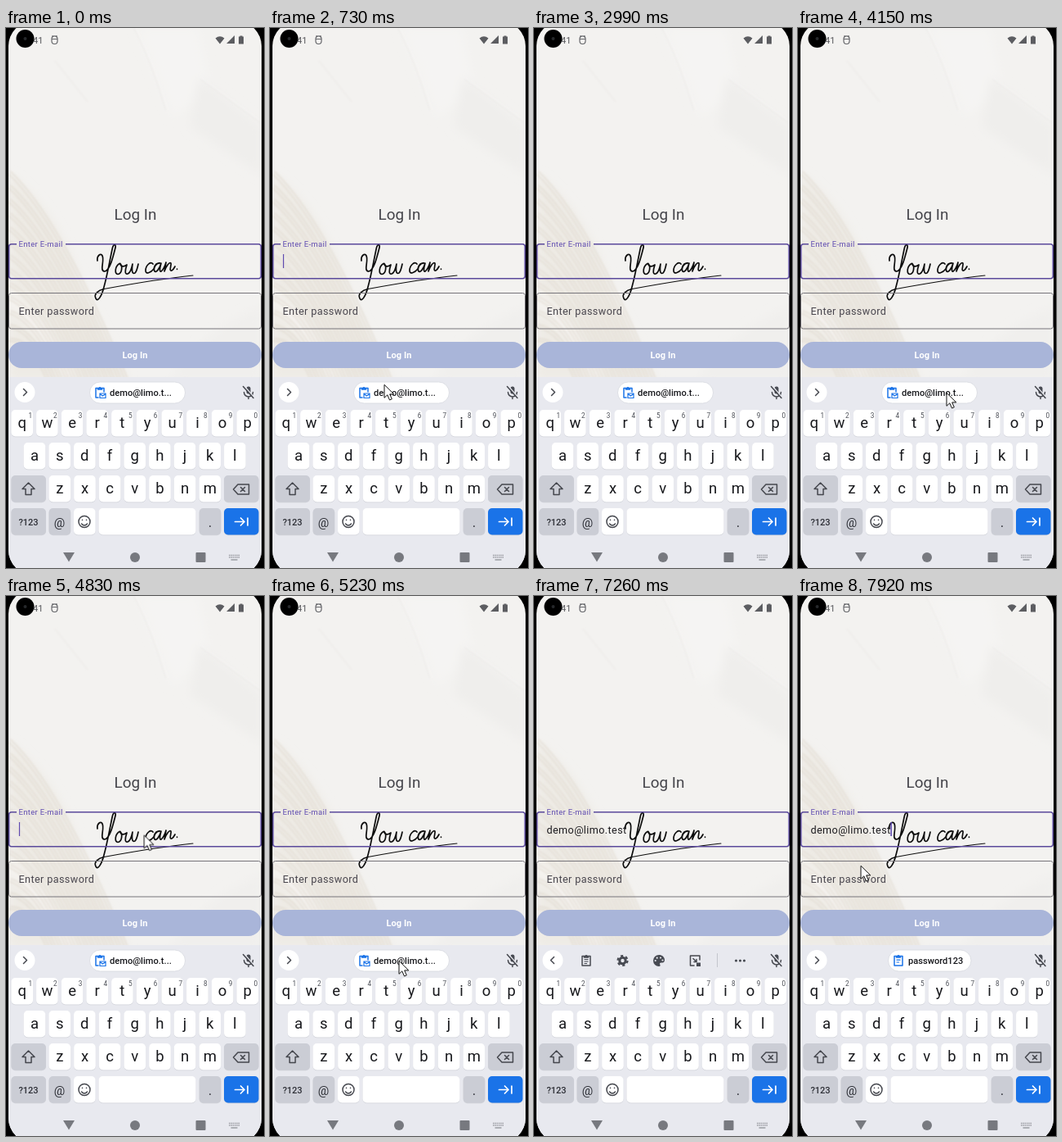
An HTML page for the animation above (7.99 s loop, 316 px wide and 659 px high).

```html
<!DOCTYPE html>
<html lang="en">
<head>
<meta charset="utf-8">
<title>Log In</title>
<style>
html, body { margin: 0; width: 100%; height: 100%; overflow: hidden; background: #000; }
svg { display: block; width: 100%; height: 100%; font-family: Roboto, "Noto Sans", sans-serif; }
.mid { text-anchor: middle; }
.field { font-size: 12.63px; letter-spacing: .39px; }
.key { font-size: 18.5px; text-anchor: middle; fill: #17181c; }
.hint { font-size: 8.2px; text-anchor: middle; fill: #4b4e56; }
.chip text { font-size: 11.1px; font-weight: 500; fill: #17181c; }
.line { fill: none; stroke: #45474e; stroke-width: 1.5; stroke-linecap: round; stroke-linejoin: round; }
.ink { fill: none; stroke: #0c0c0c; stroke-width: 1.7; stroke-linecap: round; stroke-linejoin: round; }

.anim { animation: 7990ms step-end infinite; }
#caret { animation-name: blink; }
#typed { animation-name: typed; }
#caretEnd { animation-name: blinkEnd; }
#mail { animation-name: mail; }
#tools { animation-name: tools; }
#pass { animation-name: pass; }
#mouse { animation-name: move, show; animation-duration: 7990ms, 7990ms; }

@keyframes blink {
  0%, 13.34%, 24.98%, 37.37%, 49.26%, 62.9%, 70.54%, 100% { opacity: 0; }
  6.71%, 19.22%, 31.61%, 43.38%, 57.02%, 68.79% { opacity: 1; }
}
@keyframes typed { 0% { opacity: 0; } 70.54%, 100% { opacity: 1; } }
@keyframes blinkEnd {
  0%, 77.3%, 90.81% { opacity: 0; }
  70.54%, 84.18%, 97.45%, 100% { opacity: 1; }
}
@keyframes mail {
  0% { opacity: 1; }
  69.66% { opacity: 1; animation-timing-function: steps(3); }
  72.29%, 100% { opacity: 0; }
}
@keyframes tools {
  0% { opacity: 0; }
  69.66% { opacity: 0; animation-timing-function: steps(3); }
  72.29% { opacity: 1; }
  93.19% { opacity: 1; animation-timing-function: steps(3); }
  95.82%, 100% { opacity: 0; }
}
@keyframes pass {
  0% { opacity: 0; }
  93.19% { opacity: 0; animation-timing-function: steps(3); }
  95.82%, 100% { opacity: 1; }
}
@keyframes show {
  0%, 16.72%, 77.3% { opacity: 0; }
  2.45%, 45.88%, 96.57%, 100% { opacity: 1; }
}
@keyframes move {
  0% { transform: translate(224px, 483px); }
  2.45% { transform: translate(224px, 483px); animation-timing-function: steps(8); }
  9.08% { transform: translate(139px, 434px); animation-timing-function: steps(3); }
  11.71% { transform: translate(138px, 439px); animation-timing-function: steps(5); }
  15.84% { transform: translate(160px, 448px); }
  45.88% { transform: translate(212px, 446px); animation-timing-function: steps(7); }
  51.89% { transform: translate(181px, 444px); animation-timing-function: steps(4); }
  55.27% { transform: translate(168px, 280px); }
  56.15% { transform: translate(168px, 280px); animation-timing-function: steps(3); }
  58.65% { transform: translate(170px, 265px); }
  59.52% { transform: translate(170px, 265px); animation-timing-function: steps(7); }
  65.41% { transform: translate(157px, 444px); animation-timing-function: steps(3); }
  67.91% { transform: translate(160px, 452px); animation-timing-function: steps(2); }
  69.66% { transform: translate(158px, 444px); }
  75.54% { transform: translate(102px, 444px); }
  96.57% { transform: translate(84px, 415px); animation-timing-function: steps(3); }
  99.07%, 100% { transform: translate(76px, 328px); }
}
</style>
</head>
<body>
<svg viewBox="0 0 316 659" xmlns="http://www.w3.org/2000/svg">
  <defs>
    <clipPath id="screen"><rect x="3" y="-8" width="310" height="675" rx="30"/></clipPath>
    <filter id="soft" x="-30%" y="-30%" width="160%" height="160%"><feGaussianBlur stdDeviation="6"/></filter>
    <filter id="haze" x="-30%" y="-30%" width="160%" height="160%"><feGaussianBlur stdDeviation=".8"/></filter>
    <g id="clip">
      <path d="M-5-5.5H5V6H-5Z" fill="none" stroke="currentColor" stroke-width="1.5" stroke-linejoin="round"/>
      <path d="M-3.2-6H-1.5A1.6 1.6 0 0 1 1.5-6H3.2V-3.2H-3.2Z" fill="currentColor"/>
    </g>
  </defs>

  <g clip-path="url(#screen)">
    <rect width="316" height="659" fill="#f3f2f0"/>

    <!-- creased paper -->
    <g filter="url(#soft)">
      <path d="M160 0 205 110 250 70 235 0Z" fill="#f5f4f3"/>
      <path d="M236 60 313 120V180L225 120Z" fill="#efeeec"/>
      <path d="M3 178C40 205 70 250 88 300S130 390 150 430H3Z" fill="#eeebe5"/>
      <path d="M3 330Q50 370 80 430" fill="none" stroke="#f5f3ef" stroke-width="16"/>
      <path d="M200 430Q240 370 313 340V430Z" fill="#f0efed"/>
    </g>
    <g filter="url(#haze)" fill="none">
      <path d="M157 0Q180 45 196 100M238 62 313 116M60 40 100 90" stroke="#eae8e6"/>
      <path d="M159 0Q182 45 198 100M238 60 313 114" stroke="#f9f8f7"/>
      <path id="veins" stroke="#e2dcd2" stroke-width="1.300"/>
      <use href="#veins" x="2.500" y="-3" style="mix-blend-mode:screen"/>
    </g>

    <!-- lettering -->
    <g class="ink">
      <path d="M112 284C111 278 116 274 118 278 121 284 114 297 121 297 127 296 131 280 134 268 135 264 132 263 130.500 268 127 284 124 302 120 316 117 328 112 335 110 330 107 325 113 320 120 318.500"/>
      <path d="M120 318.500C150 313 190 306 229 302" stroke-width="1.100"/>
      <path d="M139 287.500C133 291 133 300 137 300.500 142 300 143 291 140 287.500 140 291 144 292 148 289 146 295 145 301 149 300 152 299 154 293 155 288 154 295 154 301 158 299 160 297 161 293 162 288"/>
      <path d="M180 288C177 284 171 290 171 296 171 301 177 299 181 294 182 289 185 286 189 287 184 286 180 293 182 297 184 299 188 294 190 287 188 294 188 298 190 297 192 296 195 290 196 286L194 297C196 291 200 285 202 287 203 289 199 297 203 296 205 295 206 293 207 291M209.500 294v.3"/>
    </g>

    <!-- status bar -->
    <circle cx="23.500" cy="13" r="11"/>
    <circle cx="23.500" cy="13" r="2" fill="#26282b"/>
    <text x="33" y="19" font-size="11" fill="#55565a">41</text>
    <g fill="none" stroke="#66676b" stroke-width="1.200">
      <path d="M56 13.500H63V16A3.500 3.500 0 0 1 56 16ZM56 13A3.500 3.200 0 0 1 63 13M56.500 9.500l1.500 1.500M62.500 9.500 61 11"/>
    </g>
    <g fill="#5c5d61">
      <path d="M256.500 12.500Q262 8 267.500 12.500L262 19.500ZM280 9V19H270ZM285 10.500H286.500V9.500H289.500V10.500H291V19.500H285Z"/>
    </g>

    <!-- form -->
    <text class="mid" x="158.500" y="234" font-size="18.900" fill="#45454b">Log In</text>
    <path d="M13 263.700H6.700Q3.700 263.700 3.700 266.700V302.700Q3.700 305.700 6.700 305.700H309.300Q312.300 305.700 312.300 302.700V266.700Q312.300 263.700 309.300 263.700H73" fill="none" stroke="#5b4a9c" stroke-width="1.600"/>
    <text x="15.500" y="267.300" font-size="9.470" letter-spacing=".316" fill="#5f4bb0">Enter E-mail</text>
    <rect id="caret" class="anim" x="15.900" y="276" width="1.200" height="17" fill="#5f4bb0"/>
    <g id="typed" class="anim"><text class="field" x="15.500" y="290" fill="#1c1b1f">demo@limo.test</text></g>
    <rect id="caretEnd" class="anim" x="113.300" y="276" width="1.600" height="17" fill="#5f4bb0"/>
    <rect x="3.500" y="323.500" width="309" height="43.500" rx="3" fill="none" stroke="#77757b"/>
    <text class="field" x="15.500" y="350" fill="#49464e">Enter password</text>
    <rect x="3" y="383" width="310" height="32" rx="16" fill="#a9b5d9"/>
    <text class="mid" x="158" y="403" font-size="11.050" font-weight="600" letter-spacing=".08" fill="#fff">Log In</text>

    <!-- keyboard -->
    <rect y="426" width="316" height="233" fill="#e8e9ef"/>
    <circle cx="23" cy="444.500" r="12.500" fill="#fff"/>

    <g id="mail" class="anim chip">
      <path class="line" d="M21.500 440.500 25.500 444.500 21.500 448.500"/>
      <rect x="102.500" y="432" width="117" height="26" rx="13" fill="#fff" stroke="#d6d8df" stroke-width=".8"/>
      <g transform="translate(115 445)" color="#1a73e8">
        <use href="#clip"/>
        <rect x="-1.500" y="-.5" width="9.500" height="8" rx="1" fill="#fff"/>
        <path d="M0 1H7V6.500H0ZM0 1.500 3.500 4 7 1.500" fill="none" stroke="#1a73e8" stroke-width="1.200"/>
      </g>
      <text x="127" y="449">demo@limo.t...</text>
    </g>

    <g id="pass" class="anim chip">
      <path class="line" d="M21.500 440.500 25.500 444.500 21.500 448.500"/>
      <rect x="110.500" y="432" width="101.500" height="26" rx="13" fill="#fff" stroke="#d6d8df" stroke-width=".8"/>
      <g transform="translate(123 445)" color="#1a73e8">
        <use href="#clip"/>
        <path d="M-2.500-.8H2.500M-2.500 2H1" stroke="#1a73e8" stroke-width="1.200"/>
      </g>
      <text x="135" y="449">password123</text>
    </g>

    <g id="tools" class="anim">
      <path class="line" d="M24.500 440.500 20.500 444.500 24.500 448.500"/>
      <g transform="translate(64 445)" color="#474a52">
        <use href="#clip"/>
        <path d="M-2.500-1.500H2.500M-2.500 1H2.500M-2.500 3.500H1" stroke="#474a52" stroke-width="1.200"/>
      </g>
      <g transform="translate(108.500 445)" fill="none" stroke="#474a52">
        <circle r="3.700" stroke-width="3"/>
        <circle r="6" stroke-width="2.200" stroke-dasharray="3.140"/>
      </g>
      <path d="M153 438a7 7 0 1 0 0 14c1.800 0 2-1.500 1.300-2.300-.8-1.200 0-2.200 1.200-2.200h1.800c1.700 0 2.700-1.500 2.700-3.500 0-3.300-3-6-7-6Z" fill="#474a52"/>
      <g fill="#e8e9ef"><circle cx="148.700" cy="445" r="1.100"/><circle cx="150.700" cy="441.700" r="1.100"/><circle cx="155" cy="441.500" r="1.100"/><circle cx="157.500" cy="444.500" r="1.100"/></g>
      <path class="line" d="M203 444V439H191.500V451H196M195 442.500 199 446.500M199 443.500V446.500H196"/>
      <path d="M199 447.500H204V452H199Z" fill="#474a52"/>
      <path d="M224.500 436V453" stroke="#c3c5cc"/>
      <g fill="#474a52"><circle cx="247.500" cy="445" r="1.600"/><circle cx="252.500" cy="445" r="1.600"/><circle cx="257.500" cy="445" r="1.600"/></g>
    </g>

    <rect x="294.500" y="437.500" width="5" height="9" rx="2.500" fill="#474a52"/>
    <path class="line" d="M291.500 444.500A5.500 5.500 0 0 0 302.500 444.500M297 450V452.500"/>
    <path d="M292 437 304 451" stroke="#e8e9ef" stroke-width="1.500"/>
    <path class="line" d="M290.500 437.500 303 451.500"/>

    <g id="keys"></g>

    <path class="line" d="M27.500 555 35 562.500H31V569.500H24V562.500H20Z"/>
    <path class="line" d="M284 557H297.500V569H284L278.500 563ZM287.500 560.500 292.500 565.500M292.500 560.500 287.500 565.500"/>
    <g class="mid" fill="#2d2f36">
      <text x="27.500" y="607" font-size="11" font-weight="500">?123</text>
      <text x="65.500" y="608.500" font-size="15">@</text>
      <text x="250" y="609" font-size="17">.</text>
    </g>
    <circle class="line" cx="96" cy="602.500" r="7"/>
    <path class="line" d="M92.500 605Q96 609 99.500 605M93.500 600.300v.2M98.500 600.300v.2"/>
    <path class="line" d="M280.500 602.500H292M287.500 598 292 602.500 287.500 607M296 598V607" style="stroke:#fff;stroke-width:1.700"/>

    <!-- navigation -->
    <g fill="#77797f">
      <path d="M70 640H84L77 651.500Z"/>
      <circle cx="158" cy="646" r="6"/>
      <rect x="232.500" y="640" width="12" height="12" rx="1"/>
    </g>
    <path d="M273 643.500H286M273 646H286" stroke="#9a9ca2" stroke-width="1.500" stroke-dasharray="1.500 .8"/>
    <path d="M275.500 649H283.500" stroke="#9a9ca2" stroke-width="1.500"/>
  </g>

  <g id="mouse" class="anim">
    <path d="M1 1.300V17.300L4.800 13.800 7.500 20 10.300 18.800 7.700 12.900H12.800Z" fill="#fff" stroke="#111" stroke-linejoin="round"/>
  </g>
</svg>
<script>
const keys = document.getElementById('keys');
const PITCH = 30.67;
let out = '';

function cap(x, y, w, fill = '#fff') {
  out += `<rect x="${x}" y="${y + .8}" width="${w}" height="32.500" rx="5" fill="#cfd1d8"/>` +
    `<rect x="${x}" y="${y}" width="${w}" height="32.500" rx="5" fill="${fill}"/>`;
}

function row(letters, first, y, hints = '') {
  [...letters].forEach((c, i) => {
    const x = first + i * PITCH;
    cap(x - 13.3, y, 26.6);
    out += `<text class="key" x="${x}" y="${y + 22}">${c}</text>`;
    if (hints) out += `<text class="hint" x="${x + 10}" y="${y + 9.5}">${hints[i]}</text>`;
  });
}

row('qwertyuiop', 19.7, 466, '1234567890');
row('asdfghjkl', 35, 506);
row('zxcvbnm', 65.8, 546);
const GRAY = '#cbcdd5';
cap(6.4, 546, 42.5, GRAY);
cap(267, 546, 42.5, GRAY);
cap(6.4, 586, 42.5, GRAY);
cap(52.6, 586, 26.6, GRAY);
cap(83, 586, 26.6);
cap(113.5, 586, 119);
cap(236.7, 586, 26.6, GRAY);
cap(267, 586, 42.5, '#1a73e8');
keys.innerHTML = out;

// leaf veins fanning out over the paper
let d = '';
for (let i = 0; i < 13; i++) {
  d += `M3 ${178 + i * 17}Q${66 - i * 3} ${238 + i * 12} ${146 - i * 8} 430`;
}
document.getElementById('veins').setAttribute('d', d);
</script>
</body>
</html>
```
